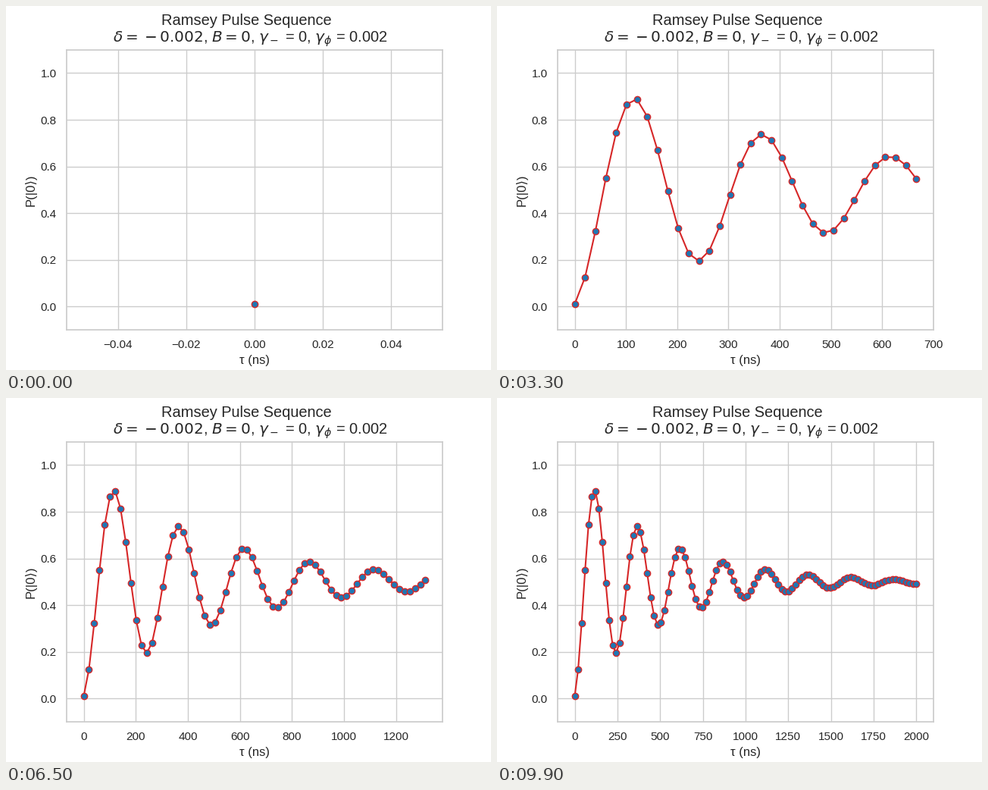
A matplotlib script for the animation above (10000 ms loop, 640 by 480 pixels).

```python
import numpy as np
import matplotlib.pyplot as plt
from matplotlib.animation import FuncAnimation

INK = "0.15"
GRID = "0.8"

plt.rcParams.update({
    "font.family": ["Liberation Sans", "DejaVu Sans"],
    "font.size": 12,
    "text.color": INK,
    "axes.labelcolor": INK,
    "axes.labelsize": 12,
    "axes.edgecolor": GRID,
    "axes.linewidth": 1.25,
    "axes.axisbelow": True,
    "axes.grid": True,
    "grid.color": GRID,
    "grid.linewidth": 1,
    "lines.solid_capstyle": "round",
})
for axis, side in (("xtick", "bottom"), ("ytick", "left")):
    plt.rcParams.update({
        f"{axis}.{side}": False,
        f"{axis}.color": INK,
        f"{axis}.labelsize": 11,
        f"{axis}.major.size": 6,
        f"{axis}.major.pad": 3.5,
    })

FRAMES = 100
PERIOD = 250      # ns, two detuning turns of 0.002 GHz
GAMMA_PHI = 0.002
PHASE = 0.159     # picked up during the finite pulses

tau = np.linspace(0, 2000, FRAMES)
prob = 0.5 - 0.4955 * np.exp(-GAMMA_PHI * tau) * np.cos(2 * np.pi * tau / PERIOD + PHASE)

fig, ax = plt.subplots(figsize=(6.4, 4.8), dpi=100)

# Explicit spaces keep the minus signs set as binary operators.
minus = r"\hspace{0.2}{-}\hspace{0.2}"
fig.suptitle(
    "Ramsey Pulse Sequence \n"
    rf" $\delta = {minus}0.002$, $B = 0$, "
    rf"$\gamma_{{{minus}}}$ = 0, $\gamma_\phi$ = 0.002",
    fontsize=14.4,
)
ax.set_xlabel("τ (ns)")
ax.set_ylabel("P(|0⟩)")
ax.set_ylim(-0.1, 1.1)

line, = ax.plot([], [], "o-", color="tab:red", lw=1.5, ms=6,
                mfc="tab:blue", mec="tab:red", mew=1)


def update(i):
    line.set_data(tau[:i + 1], prob[:i + 1])
    if i == 0:
        ax.set_xlim(-0.055, 0.055)
    else:
        pad = 0.05 * tau[i]
        ax.set_xlim(-pad, tau[i] + pad)
    return line,


anim = FuncAnimation(fig, update, frames=FRAMES, init_func=lambda: update(0),
                     interval=100, repeat=True, repeat_delay=0, blit=False)
plt.show()
```
